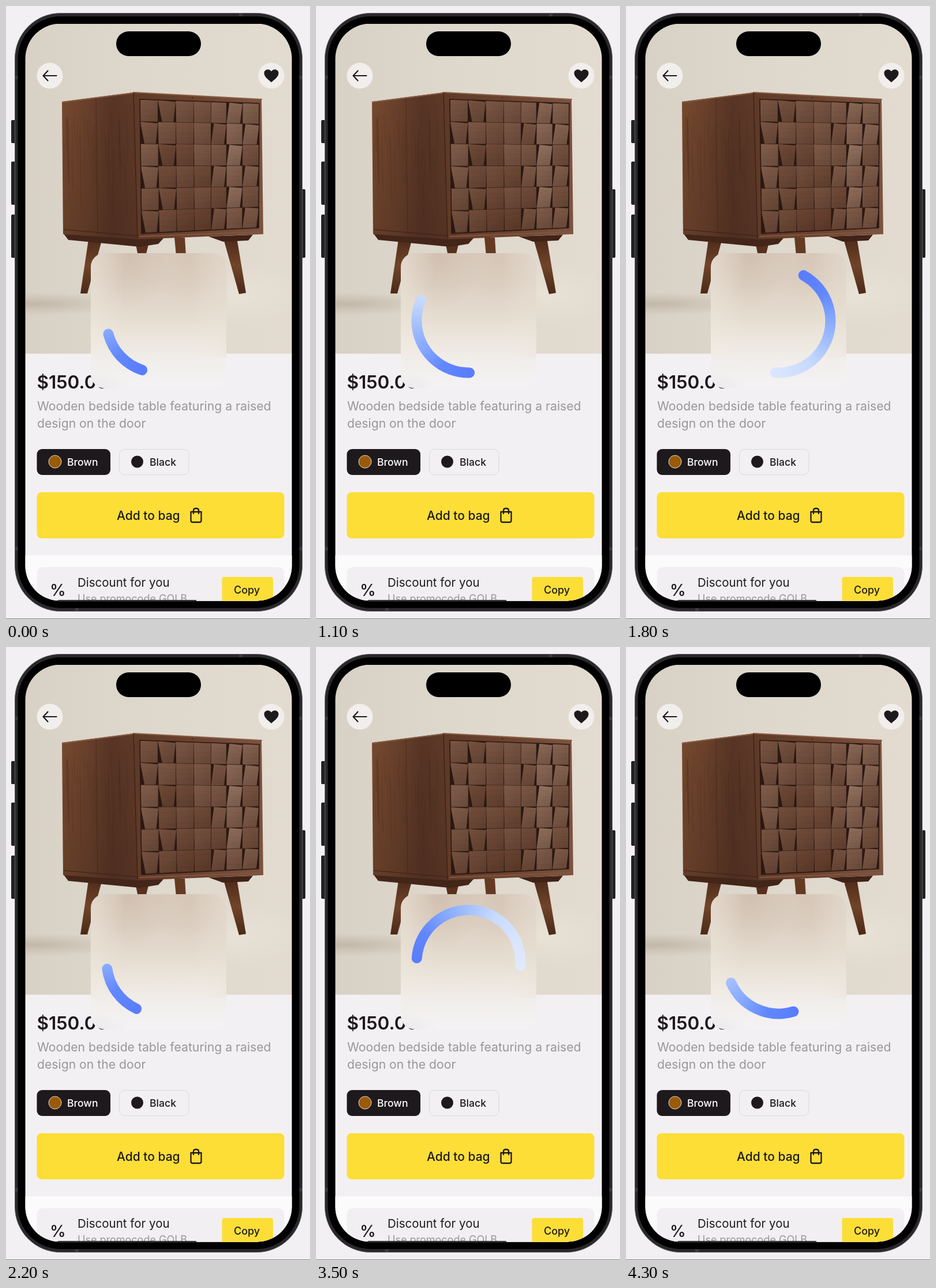
These frames come from a looping animation (527 px wide and 1064 px high, 4.4 s). An HTML page with a canvas:

```html
<!DOCTYPE html>
<html lang="en">
<head>
<meta charset="utf-8">
<title>Product page loader</title>
<style>
  html, body { margin: 0; width: 100%; height: 100%; overflow: hidden; background: #f2f0f3; }
  canvas { display: block; width: 527px; height: 1064px; }
</style>
</head>
<body>
<canvas id="stage" width="527" height="1064"></canvas>
<script>
const W = 527, H = 1064, LOOP = 4400, STEP = 100, CYCLE = 2187;
const INK = '#1d191d', YELLOW = '#fcde37', PAPER = '#f3f0f3', GREY = '#999699';
const ctx = document.getElementById('stage').getContext('2d');
const scene = document.createElement('canvas');
scene.width = W;
scene.height = H;
const g = scene.getContext('2d');

function box(x, y, x2, y2, r, fill, stroke) {
  g.beginPath();
  g.roundRect(x, y, x2 - x, y2 - y, r);
  paint(fill, stroke);
}

function paint(fill, stroke, width = 1) {
  if (fill) { g.fillStyle = fill; g.fill(); }
  if (stroke) { g.strokeStyle = stroke; g.lineWidth = width; g.stroke(); }
}

function poly(fill, ...pts) {
  g.beginPath();
  pts.forEach(([x, y]) => g.lineTo(x, y));
  g.closePath();
  paint(fill);
}

function disc(x, y, r, fill, stroke) {
  g.beginPath();
  g.arc(x, y, r, 0, 7);
  paint(fill, stroke);
}

function line(path, width, color = INK) {
  g.lineCap = g.lineJoin = 'round';
  g.lineWidth = width;
  g.strokeStyle = color;
  g.stroke(new Path2D(path));
}

function ramp(x, y, x2, y2, ...colors) {
  const grad = g.createLinearGradient(x, y, x2, y2);
  colors.forEach((c, i) => grad.addColorStop(i / (colors.length - 1), c));
  return grad;
}

// Soft elliptical spot
function glow(x, y, rx, ry, rgb, alpha) {
  g.save();
  g.translate(x, y);
  g.scale(rx, ry);
  const grad = g.createRadialGradient(0, 0, 0, 0, 0, 1);
  grad.addColorStop(0, `rgba(${rgb},${alpha})`);
  grad.addColorStop(0.5, `rgba(${rgb},${alpha * 0.45})`);
  grad.addColorStop(1, `rgba(${rgb},0)`);
  g.fillStyle = grad;
  g.fillRect(-1, -1, 2, 2);
  g.restore();
}

function text(str, x, y, size, weight = 400, color = INK) {
  g.font = `${weight} ${size}px Inter, sans-serif`;
  g.fillStyle = color;
  g.fillText(str, x, y);
}

function makeRandom(seed) {
  return () => (seed = seed * 16807 % 2147483647) / 2147483647;
}

const mix = (a, b, k) => a + (b - a) * k;

function drawPhone() {
  g.fillStyle = '#f2f0f3';
  g.fillRect(0, 0, W, H);
  g.fillStyle = '#858386';
  g.fillRect(0, 1063, W, 1);
  for (const [y, y2] of [[198, 238], [270, 345], [362, 437]]) box(9, y, 18, y2, 2, '#222123');
  box(510, 318, 519, 437, 2, '#222123');
  box(15.5, 12.5, 513.5, 1050.5, 79, '#29282a', '#5a595c');
  g.fillStyle = '#3d3c3e';
  for (const y of [121, 939]) {
    g.fillRect(16, y, 5, 6);
    g.fillRect(508, y, 5, 6);
  }
  g.fillRect(404, 13, 6, 5);
  g.fillRect(120, 1045, 6, 5);
  box(20.5, 18, 508.5, 1045, 74, '#000');
}

function drawBackdrop() {
  g.fillStyle = ramp(34, 0, 495, 0, '#d8d1c5', '#dfd8cd', '#e3dbd0');
  g.fillRect(33, 31, 463, 573);
  glow(50, 517, 170, 20, '150,132,112', 0.34);
  glow(400, 500, 110, 55, '238,231,220', 0.6);
}

// Tiles brighten toward the light at the upper right
function drawTiles() {
  const rand = makeRandom(731);
  const at = (u, v) => [
    mix(mix(232, 439, u), mix(235, 438, u), v),
    mix(mix(162, 169, u), mix(394, 385, u), v)
  ];
  const cols = [0, .15, .3, .45, .595, .725, .86, 1];
  const base = [92, 56, 39], pale = [157, 128, 112];
  poly('#2c1811', at(0, 0), at(1, 0), at(1, 1), at(0, 1));
  for (let r = 0; r < 6; r++) {
    for (let c = 0; c < 7; c++) {
      const u = c / 6, v = r / 5, odd = (r + c) % 2;
      const light = 0.06 + 0.22 * u + 0.16 * (1 - v) + (c === 0 || c === 5 ? 0.2 : 0) + (rand() - 0.5) * 0.26;
      const tone = base.map((b, i) => mix(b, pale[i], Math.max(0, light)));
      const shade = k => `rgb(${tone.map(n => Math.round(n * k))})`;
      const lean = odd && c !== 2 && c !== 3 ? 0.024 : 0.002;
      const flip = c > 3 ? -1 : 1;
      const a = cols[c] + 0.001, b = cols[c + 1] - 0.001;
      const top = r / 6 + 0.002, end = (r + 1) / 6 - 0.002;
      const p = at(a + (flip < 0 ? lean : 0), top), q = at(b, top + lean * 0.4);
      const s = at(b - lean * 0.8, end), t = at(a + (flip > 0 ? lean * 1.4 : 0), end);
      poly(ramp(p[0], p[1], s[0], s[1], shade(1.1), shade(1), shade(0.88)), p, q, s, t);
      line(`M${p}L${q}`, 0.7, 'rgba(180,140,112,.35)');
      for (let i = 1; i < 4; i++) {
        const y = mix(top, end, i / 4);
        const from = at(a + lean + 0.008, y), to = at(b - lean - 0.008, y + (rand() - 0.5) * 0.025);
        line(`M${from}L${to}`, 0.6, 'rgba(42,20,12,.12)');
      }
    }
  }
}

function drawCabinet() {
  const leg = ramp(0, 400, 0, 500, '#4b2918', '#704429', '#4a2a18');
  poly(leg, [143, 405], [166, 407], [141, 499], [129, 499]);
  poly(leg, [377, 404], [400, 402], [416, 498], [404, 500]);
  poly('#57301d', [225, 414], [247, 414], [242, 434], [229, 434]);
  poly('#653a22', [292, 402], [310, 402], [312, 434], [295, 434]);
  poly('#432519', [99, 394], [229, 402], [274, 402], [264, 413], [232, 418], [108, 406]);
  poly('#402217', [351, 400], [428, 397], [420, 407], [376, 409]);
  poly(ramp(97, 0, 228, 0, '#76492f', '#68402b', '#573425', '#5f3a28'),
    [97, 166], [221, 150], [229, 405], [99, 396]);
  poly(ramp(0, 160, 0, 400, 'rgba(40,22,16,0)', 'rgba(40,22,16,.2)'),
    [97, 166], [221, 150], [229, 405], [99, 396]);
  const rand = makeRandom(97);
  for (let i = 0; i < 45; i++) {
    const x = 101 + rand() * 114, y = 174 + rand() * 80, len = 40 + rand() * 85;
    const k = rand() * 5 - 2;
    line(`M${x} ${y}q${k} ${len / 2} 2 ${len}`, 0.5 + rand() * 0.8, 'rgba(42,21,12,.13)');
  }
  line('M98 167L221 151', 2, '#85573e');
  line('M156 160L159 396', 0.8, 'rgba(38,18,11,.45)');
  line('M100 388L228 399', 1, '#3b2015');
  poly(ramp(221, 0, 446, 0, '#5f3927', '#6c432f', '#7b5340'),
    [221, 150], [443, 162], [446, 396], [228, 405]);
  line('M221 150L443 162', 2, '#875d45');
  line('M221 151L228 403', 1.4, '#39201a');
  line('M232 400L445 392', 2, '#82563f');
  drawTiles();
  line('M232 162L439 169L438 385L235 395Z', 1.6, '#2c1811');
  disc(323, 159.5, 1, '#27150f');
}

function drawTopBar() {
  box(191, 44, 338, 87, 21.5, '#000');
  disc(76, 121, 22.5, '#f1eeec');
  disc(460, 121, 22.5, '#f1eeec');
  line('M64.5 121H87.5M72.5 112.5L64.5 121L72.5 129.5', 2.2);
  g.fillStyle = INK;
  g.fill(new Path2D('M460 132.5C456 128.5 447.5 123.5 447.5 116.5C447.5 110 456 108 460 113.5' +
    'C464 108 472.5 110 472.5 116.5C472.5 123.5 464 128.5 460 132.5Z'));
}

function drawDetails() {
  g.fillStyle = PAPER;
  g.fillRect(33, 603.5, 463, 430);
  text('$150.00', 53.5, 664, 31.5, 600);
  text('Wooden bedside table featuring a raised', 54, 701.5, 21.2, 400, GREY);
  text('design on the door', 54, 731.5, 21.2, 400, GREY);

  box(53.5, 769, 181, 814, 9, INK);
  disc(85, 791, 11, '#995b08', '#e6dcd0');
  text('Brown', 106, 797.5, 17.6, 500, '#fff');
  box(196.5, 769.5, 317, 813.5, 9, null, '#dbd8db');
  disc(227.5, 791, 10.5, INK);
  text('Black', 249, 797.5, 17.6, 500);

  box(53.5, 844, 482.5, 924, 8, YELLOW);
  text('Add to bag', 192, 891.5, 21, 500);
  line('M320.5 878H338.5V893Q338.5 896 335.5 896H323.5Q320.5 896 320.5 893Z' +
    'M325 881V875.5Q325 872 329.5 872Q334 872 334 875.5V881', 2.3);

  g.fillStyle = '#fcfbfc';
  g.fillRect(33, 953.5, 463, 80);
  box(53.5, 974, 482.5, 1060, 10, '#f2eff2');
  text('%', 76, 1024, 28, 500);
  text('Discount for you', 124, 1008, 20.5);
  text('Use promocode GOLB', 124, 1034.5, 18, 400, GREY);
  box(374.5, 991, 463, 1060, 4, YELLOW);
  text('Copy', 395, 1020, 18, 500);
  g.fillStyle = '#000';
  g.fillRect(90, 1031, 240, 2);
}

function drawGlass() {
  g.save();
  g.beginPath();
  g.roundRect(147, 429, 235, 234.5, 24);
  g.clip();
  g.fillStyle = ramp(0, 429, 0, 664, '#d9ccbf', '#dcd0c3', '#e2d8cb', '#ebe4da', '#f1eeec', '#f4f2f4');
  g.fillRect(147, 429, 235, 235);
  glow(215, 436, 75, 90, '180,150,128', 0.22);
  glow(315, 445, 65, 75, '195,165,140', 0.15);
  g.fillStyle = ramp(147, 0, 382, 0, 'rgba(242,235,225,.4)', 'rgba(242,235,225,0)',
    'rgba(242,235,225,0)', 'rgba(242,235,225,0)', 'rgba(234,226,215,.4)');
  g.fillRect(147, 429, 235, 180);
  glow(158, 663, 55, 26, '225,224,225', 0.45);
  g.restore();
}

function drawScene() {
  drawPhone();
  g.save();
  g.beginPath();
  g.roundRect(33.5, 30.5, 462, 1002, 61);
  g.clip();
  drawBackdrop();
  drawCabinet();
  drawTopBar();
  drawDetails();
  drawGlass();
  g.restore();
}

// Monotone cubic through one cycle of keys; `gain` is added every cycle
const TIMES = [0, 500, 1100, 1313, 1800, 2113, CYCLE];
function track(keys, gain) {
  const vals = [...keys, keys[0] + gain];
  const n = TIMES.length - 1;
  const rate = i => {
    const k = (i + n) % n;
    return (vals[k + 1] - vals[k]) / (TIMES[k + 1] - TIMES[k]);
  };
  const slope = i => {
    const a = rate(i - 1), b = rate(i);
    return a * b > 0 ? 2 * a * b / (a + b) : 0;
  };
  return t => {
    let i = 0;
    while (i < n - 1 && t >= TIMES[i + 1]) i++;
    const d = TIMES[i + 1] - TIMES[i], s = (t - TIMES[i]) / d, r = 1 - s;
    return vals[i] * (1 + 2 * s) * r * r + vals[i + 1] * s * s * (3 - 2 * s)
      + d * s * r * (slope(i) * r - slope(i + 1) * s);
  };
}

const turnAt = track([108.4, 397.8, 809, 904.1, 1018.7, 1153.2], 1080);
const spanAt = track([57, 56.5, 115, 180, 155, 83], 0);
const FADE = [[0, '#5a7dfd'], [30, '#6187fe'], [57, '#83a6fe'], [85, '#a3bffe'],
  [115, '#c8dafe'], [155, '#dbe6fd'], [200, '#e4ecfc'], [330, '#e4ecfc'], [340, '#5a7dfd'], [360, '#5a7dfd']];

function drawSpinner(t) {
  const cx = 264.5, cy = 546.5, rad = Math.PI / 180;
  const phase = t % CYCLE;
  const start = turnAt(phase) % 360 * rad;
  const grad = ctx.createConicGradient(start, cx, cy);
  FADE.forEach(([deg, color]) => grad.addColorStop(deg / 360, color));
  ctx.beginPath();
  ctx.arc(cx, cy, 90, start, start + spanAt(phase) * rad);
  ctx.lineCap = 'round';
  ctx.lineWidth = 18;
  ctx.strokeStyle = grad;
  ctx.stroke();
}

function frame(now) {
  const t = Math.floor(now % LOOP / STEP) * STEP;
  ctx.drawImage(scene, 0, 0);
  drawSpinner(t);
  requestAnimationFrame(frame);
}

drawScene();
requestAnimationFrame(frame);
</script>
</body>
</html>
```
